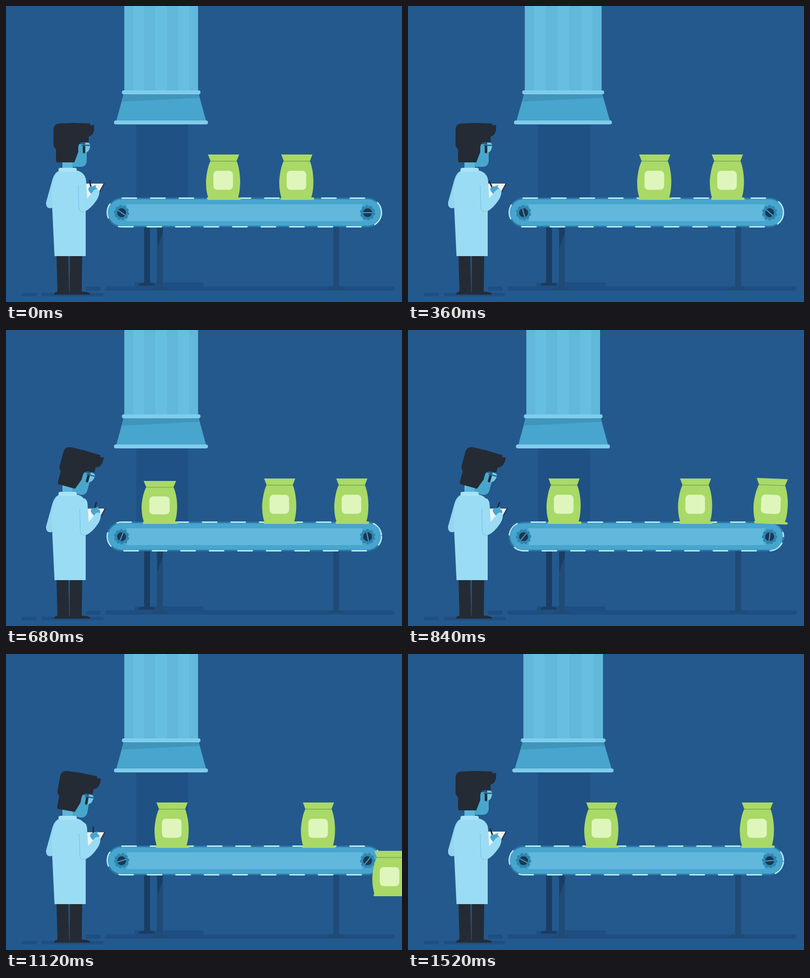
Animation of 800 by 600 pixels, one loop 1.56 s. Source, as an HTML page:

```html
<!DOCTYPE html>
<html lang="en">
<head>
<meta charset="utf-8">
<title>Conveyor belt</title>
<style>
  html, body { margin: 0; height: 100%; overflow: hidden; background: #24598d; }
  svg { display: block; width: 100vw; height: 100vh; }
</style>
</head>
<body>
<svg viewBox="0 0 800 600">
  <defs>
    <g id="bag">
      <path fill="#a9d967" d="M-31-92H32L27-79C31-68 34-54 34-38C34-22 32-10 29-3H-30C-34-14-35-26-35-38C-34-54-31-68-26-79Z"/>
      <path d="M-30-2.5H33" stroke="#a9d967" stroke-width="5" stroke-linecap="round"/>
      <path d="M-26-78.5H27" stroke="#63903f" stroke-width="1.3" stroke-dasharray="2 1"/>
      <rect x="-20" y="-59" width="39.5" height="38.5" rx="8" fill="#def6bb"/>
    </g>
    <g id="gear">
      <circle r="13.5" fill="#2d86b0"/>
      <circle r="14" fill="none" stroke="#2d86b0" stroke-width="3" stroke-dasharray="5 3.8"/>
      <circle r="9" fill="#1d3651"/>
      <path d="M-9 0H9" stroke="#48a3ca" stroke-width="2"/>
    </g>
    <path id="foot" d="M-16.5 0Q-16.5-6-9-6H9Q16.5-6 16.5 0Z"/>
  </defs>

  <rect width="800" height="600" fill="#24598d"/>

  <!-- floor and wall shadows -->
  <path fill="#1f5184" d="M263 238H368V392H263Z"/>
  <g stroke="#1e4f82" stroke-linecap="round">
    <path stroke-width="9" d="M205 572.5H781M165 573H187M264 564.5H395"/>
    <path stroke-width="7" d="M35 585H59M75 585H194"/>
  </g>

  <!-- conveyor -->
  <g fill="#1a3e63">
    <path d="M279 446H291V563H279Z"/>
    <use href="#foot" x="284.5" y="567"/>
  </g>
  <g fill="#1f4b76">
    <path d="M305 446H317V570H305ZM661 446H673V570H661Z"/>
    <use href="#foot" x="310.5" y="575"/>
    <use href="#foot" x="666.5" y="575"/>
  </g>
  <path fill="#1a3e63" d="M305 446H317V458L306 490ZM661 446H673V450H661Z"/>
  <rect x="205" y="390" width="553.5" height="57" rx="28.5" fill="#48a5cd" stroke="#287aa5" stroke-width="3"/>
  <path fill="#61b8dc" d="M243 402H721Q714 419 721 436H243Q250 419 243 402Z"/>
  <path id="dashes" fill="none" stroke="#b5e8fa" stroke-width="2.8" stroke-linecap="round" stroke-dasharray="29 28.6"
    d="M758.5 418.5A29 29 0 0 1 729.5 447.5H233.5A29 29 0 0 1 233.5 389.5H729.5A29 29 0 0 1 758.5 418.5"/>
  <use id="gearL" href="#gear"/>
  <use id="gearR" href="#gear"/>

  <use id="bagA" href="#bag"/>
  <use id="bagB" href="#bag"/>
  <use id="bagC" href="#bag"/>

  <!-- pipe -->
  <g id="pipe">
    <path fill="#61b8db" d="M239 0H388V175H239Z"/>
    <path fill="#66bfe1" d="M257 0H279V175H257ZM302 0H325V175H302ZM348 0H370V175H348Z"/>
    <path fill="#48a5cd" d="M238 177H389L405 236H222Z"/>
    <path fill="#3f96ba" d="M238 177H389L391 186L233.5 194Z"/>
    <path stroke="#80ccec" stroke-width="8" stroke-linecap="round" d="M238 175H389M222 236H404"/>
  </g>

  <!-- scientist -->
  <path fill="#242b35" d="M102 505H154L153 579Q169 579 170 585H97Q97 580 104 579Z"/>
  <path fill="#24598d" d="M126 507H129L128.5 580H127.5Z"/>
  <path fill="#5db6da" d="M114 312H135V332H114Z"/>
  <g id="head">
    <path fill="#48a6cd" d="M137 280H160Q164 291 163 304V315Q162 325 152 326H134Z"/>
    <path fill="#242b35" d="M96 251Q96 239 109 238L136 237L170 238V242L178 241V250Q177 262 167 265V276H153Q146 278 146 288V296L138 317H103Q101 316 101 309V290Q96 287 96 280Z"/>
    <path fill="#73c7e7" d="M160 277H166Q171 279 170 285Q168 296 161 297Z"/>
    <path d="M157.5 283V296" stroke="#242b35" stroke-width="5" stroke-linecap="round"/>
    <path d="M153 282.5H170" stroke="#22648b" stroke-width="2.5"/>
  </g>
  <path fill="#94d5f0" d="M107 334Q98 338 94 351L81 398Q80 410 90 410L100 407Z"/>
  <path fill="#9bdcf5" d="M108 333H142Q158 337 161 350V507H98L92 380Q94 345 108 333Z"/>
  <rect x="106" y="328" width="37" height="8" rx="4" fill="#a8e3f8"/>
  <g id="clipboard">
    <path fill="#263445" d="M194 359.500H200L185 386H178Z"/>
    <path fill="#edf3f5" d="M161 360H197L181 389L161 393Z"/>
  </g>
  <g id="hand">
    <path id="pen" d="M0 0V-19" stroke="#242b35" stroke-width="3" stroke-linecap="round"/>
    <path fill="#48a6cd" d="M166 371Q168 365 174 366L182 363L181 368Q187 370 185 377L180 387Q167 378 166 371Z"/>
  </g>
  <g id="sleeve">
    <path fill="#9bdcf5" d="M147 352Q150 340 157 343Q162 347 162 358L164 390L178 373Q186 368 189 376Q188 387 182 395Q171 411 160 416Q147 421 147 408Z"/>
    <path fill="none" stroke="#7cc8e8" stroke-width="1.5" d="M146 364L147 409Q148 418 157 417"/>
  </g>
</svg>

<script>
const LOOP = 1560, STEP = 40, BELT_Y = 393;
const part = id => document.getElementById(id);
const place = (id, transform) => part(id).setAttribute('transform', transform);
const progress = (t, from, to) => Math.max(0, Math.min(1, (t - from) / (to - from)));
const smooth = (t, from, to) => {
  const p = progress(t, from, to);
  return p * p * (3 - 2 * p);
};
const pulse = (t, from, to) => Math.sin(Math.PI * progress(t, from, to)) ** 2;

function drawBelt(t) {
  const spin = 180 * t / LOOP;
  part('dashes').setAttribute('stroke-dashoffset', -240 * t / LOOP);
  place('gearL', `translate(233.5 419) rotate(${33 + spin})`);
  place('gearR', `translate(730.5 419) rotate(${spin})`);
}

function drawBags(t) {
  const ride = .16 * t + 1e-5 * t * t;
  place('bagA', `translate(${439 + ride} ${BELT_Y})`);

  // The leading bag tips over the roller and drops to a lower level.
  const x = 587 + .98 * ride + 22 * pulse(t, 760, 1160) - 5 * smooth(t, 1000, 1280);
  const drop = 98 * progress(t, 960, 1120) ** 2;
  place('bagB', `translate(${x} ${BELT_Y + drop}) rotate(${9 * pulse(t, 780, 1120)} 0 -40)`);

  // The new bag falls out of the pipe, squashes, then picks up speed.
  const fall = 168 * (progress(t, 390, 590) - 1);
  const squash = .055 * pulse(t, 600, 760);
  const start = 310 + 1e-4 * Math.max(0, t - 620) ** 2;
  place('bagC', `translate(${start} ${BELT_Y + fall}) scale(${1 + .75 * squash} ${1 - squash})`);
}

function drawPipe(t) {
  const swell = 1 + .062 * pulse(t, 0, 520) + .082 * pulse(t, 1290, 1810);
  place('pipe', `translate(313.4 0) scale(${swell} 1) translate(-313.4 0)`);
}

function drawScientist(t) {
  const bend = smooth(t, 360, 680) - smooth(t, 960, 1380);
  const scribble = 14 * Math.cos(2 * Math.PI * (t - 520) / 440);
  place('head', `rotate(${15 * bend} 121 325)`);
  place('clipboard', `translate(${2 * bend} ${2 * bend})`);
  place('hand', `translate(${5 * bend} ${-5 * bend})`);
  place('sleeve', `translate(${3 * bend} ${-bend})`);
  place('pen', `translate(172.5 373) rotate(${40 * bend - 16 + scribble})`);
}

function tick() {
  const t = Math.floor(performance.now() % LOOP / STEP) * STEP;
  drawBelt(t);
  drawBags(t);
  drawPipe(t);
  drawScientist(t);
  requestAnimationFrame(tick);
}
tick();
</script>
</body>
</html>
```
